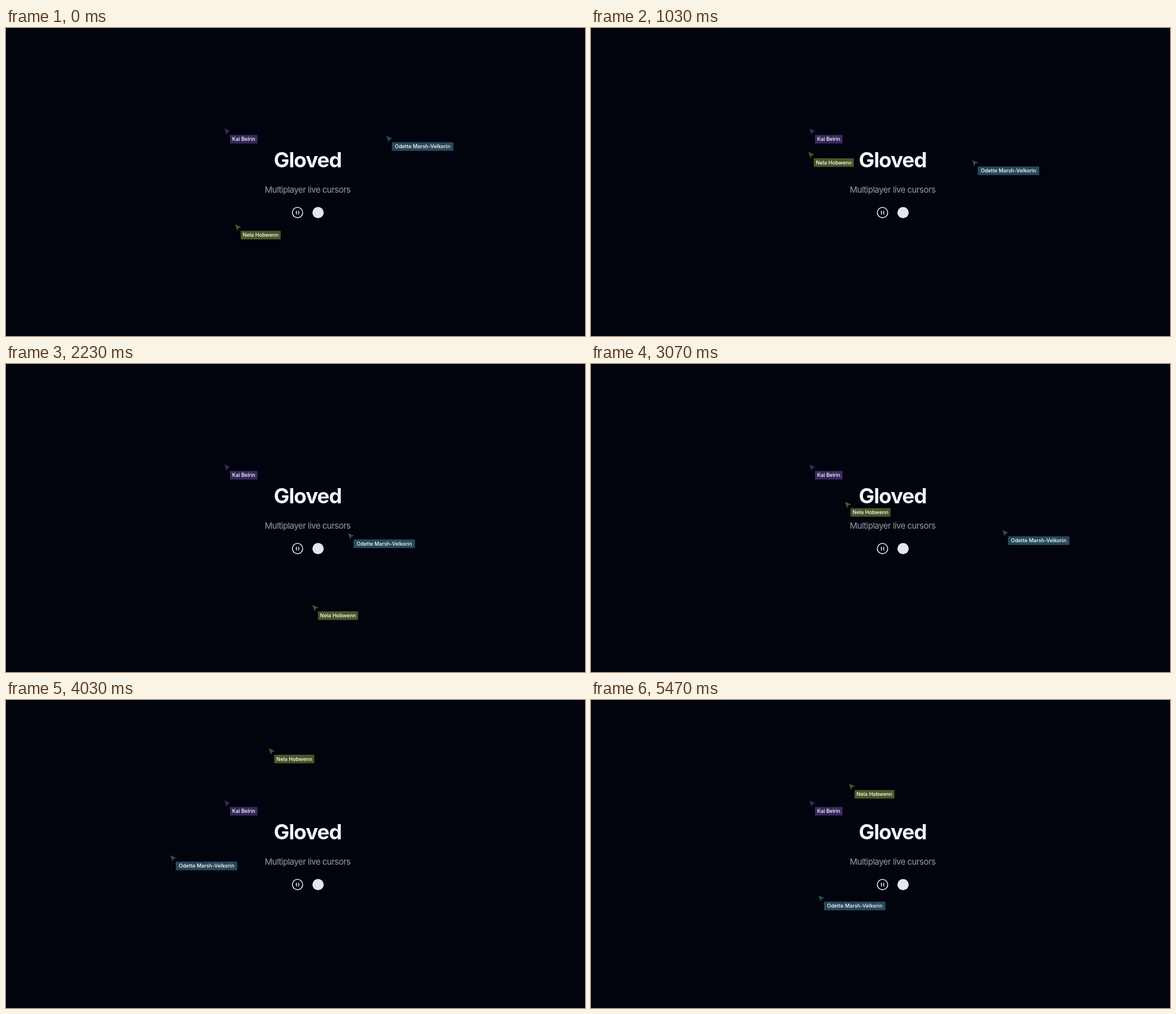
Write an HTML page that moves like this. It is 1026x546 px and loops after 5.51 s.

```html
<!DOCTYPE html>
<html lang="en">
<head>
<meta charset="utf-8">
<title>Live cursors</title>
<style>
  html, body { margin: 0; width: 100%; height: 100%; overflow: hidden; background: #01030d; }
  svg { display: block; width: 1026px; height: 546px; font-family: Inter, "Open Sans", sans-serif; }
  text { text-anchor: middle; }
  .title { font-size: 37px; font-weight: 700; letter-spacing: -0.03em; fill: #f3f4f8; }
  .subtitle { font-size: 15px; letter-spacing: -0.035em; fill: #999da8; }
  .label { font-size: 9.1px; font-weight: 500; fill: #fff; }
</style>
</head>
<body>
<svg id="stage" viewBox="0 0 1026 546">
  <text class="title" x="534.5" y="247">Gloved</text>
  <text class="subtitle" x="534.5" y="292">Multiplayer live cursors</text>
  <g fill="none" stroke="#e9eaef" stroke-width="1.6">
    <circle cx="516.6" cy="327.2" r="9.2"/>
    <path d="M514.6 323.9v6.6M518.6 323.9v6.6"/>
  </g>
  <circle cx="553" cy="327.2" r="10" fill="#e4e6ec"/>
</svg>
<script>
const LOOP = 5510, STEP = 100 / 3, LAST_STEP = 164;

// A path holds the turning points of the arrow tip: [time in ms, x, y].
const cursors = [
  { name: "Kai Belrin", width: 49, color: "#38295b", path: [[0, 387, 178]] },
  { name: "Odette Marsh-Velkorin", width: 109, color: "#274a5b", path: [
    [0, 674, 191], [540, 655, 156], [830, 751, 187], [1030, 675.5, 234],
    [1700, 274, 306], [2230, 606, 299.5], [2820, 761, 190], [3070, 729, 294],
    [3730, 199, 320], [4030, 291, 275], [4720, 302, 312], [5470, 403, 346]] },
  { name: "Nela Hobwenn", width: 71, color: "#4b5627", path: [
    [0, 406, 348], [570, 440, 313], [1030, 385, 219.5], [1350, 421, 151],
    [1700, 505, 198], [2230, 543, 427], [2430, 505, 448], [2830, 392, 397],
    [3070, 450, 244], [3880, 478, 77], [4030, 465.5, 85.5], [5130, 463, 82],
    [5470, 457, 148]] },
];

// Monotone cubic interpolation: smooth, and never beyond the turning points.
function sample(path, axis, time) {
  if (path.length < 2) return path[0][axis];
  const last = path.length - 1;
  const secant = i => (path[i + 1][axis] - path[i][axis]) / (path[i + 1][0] - path[i][0]);
  const slope = i => {
    if (i === 0 || i === last) return secant(i ? i - 1 : 0);
    const before = secant(i - 1), after = secant(i);
    return before * after > 0 ? 2 * before * after / (before + after) : 0;
  };
  let i = 0;
  while (i < last - 1 && time >= path[i + 1][0]) i++;
  const span = path[i + 1][0] - path[i][0];
  const u = (time - path[i][0]) / span, v = 1 - u;
  return path[i][axis] * v * v * (1 + 2 * u) + path[i + 1][axis] * u * u * (1 + 2 * v)
    + span * u * v * (slope(i) * v - slope(i + 1) * u);
}

const stage = document.getElementById("stage");

for (const cursor of cursors) {
  const group = document.createElementNS("http://www.w3.org/2000/svg", "g");
  group.innerHTML = `
    <path d="M0 0 11 5 6 6.6 3.8 11.6Z" fill="${cursor.color}"/>
    <rect x="9.8" y="11.6" width="${cursor.width}" height="15.2" rx="1.2" fill="${cursor.color}"/>
    <text class="label" x="${9.8 + cursor.width / 2}" y="22.4">${cursor.name}</text>`;
  cursor.group = stage.appendChild(group);
}

// Motion advances in whole steps of a 30 Hz clock, rounded to 10 ms.
function draw(now) {
  const step = Math.min(LAST_STEP, Math.floor((now % LOOP + 5) / STEP));
  const time = Math.round(step * STEP / 10) * 10;
  for (const { group, path } of cursors) {
    group.setAttribute("transform", `translate(${sample(path, 1, time)} ${sample(path, 2, time)})`);
  }
}

const start = performance.now();
function tick() {
  draw(performance.now() - start);
  requestAnimationFrame(tick);
}
tick();
</script>
</body>
</html>
```
